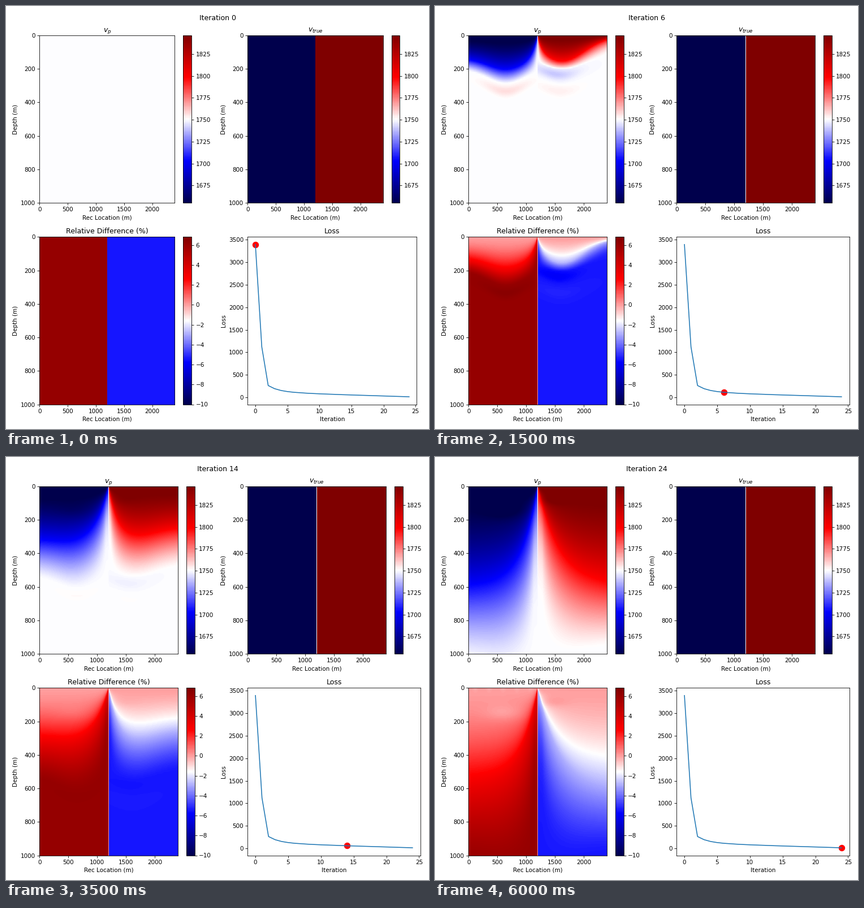
Animation of 748 by 748 pixels, one loop 6250 ms. Source, as a matplotlib script:

```python
import numpy as np
import matplotlib.pyplot as plt
from matplotlib.animation import FuncAnimation

SIZE, COUNT = 748, 25
V0, V_LEFT, V_RIGHT = 1750, 1650, 1850
VEL_RANGE, DIFF_RANGE = (1655, 1846.3), (-10, 6.82)

x, z = np.meshgrid(np.arange(5, 2400, 10.0), np.arange(5, 1000, 10.0))
d = np.abs(x - 1200)
right = x > 1200
v_true = np.where(right, V_RIGHT, V_LEFT)

# Front shape per iteration: depth at the edge, bulge, lateral scale
# of the half-strength contour; then depth and bulge of the deepest reach.
KEYS = [0, 4, 6, 10, 14, 18, 24]
LEFT = dict(
    edge=[20, 72, 140, 225, 320, 410, 597],
    bulge=[40, 92, 65, 45, 25, 10, 0],
    scale=[60, 70, 90, 160, 220, 280, 280],
    reach=[50, 110, 205, 375, 535, 705, 1030],
    swell=[40, 115, 85, 75, 75, 65, 50],
    center=550, width=450)
RIGHT = dict(
    edge=[-10, -15, 10, 160, 250, 372, 600],
    bulge=[50, 122, 148, 100, 55, 0, 0],
    scale=[50, 50, 50, 110, 130, 190, 370],
    reach=[10, 40, 125, 310, 480, 670, 960],
    swell=[50, 90, 80, 60, 70, 80, 40],
    center=420, width=550)

LOSS_X = [0, 1, 2, 3, 4, 5, 6, 8, 10, 14, 24]
LOSS_Y = [3393, 1120, 262, 192, 152, 128, 112, 92, 78, 57, 12]
steps = np.arange(COUNT)
loss = np.interp(steps, LOSS_X, LOSS_Y)


def bell(value, center, width):
    return np.exp(-((value - center) / width) ** 2)


def front(side, n):
    """Strength of the recovered anomaly, and the depth it reaches."""
    def at(name):
        return np.interp(n, KEYS, side[name])

    hump = bell(d, side["center"], side["width"])
    half = (at("edge") + at("bulge") * hump) * (1 - np.exp(-d / at("scale")))
    half = np.maximum(half, 2)
    reach = at("reach") + at("swell") * hump
    reach = np.maximum(reach, half + 15)
    fall = np.minimum(1 + 0.4 * (reach - half) / half, 4)
    t = np.clip((z - half) / (reach - half), 0, 1)
    upper = 1 - 0.53 * np.minimum(z / half, 1) ** 1.65
    return np.where(z < half, upper, 0.47 * (1 - t) ** fall), reach


def velocity(n):
    if n == 0:
        return np.full_like(x, V0)
    power = np.interp(n, [0, 1, 2, 3], [0, 0.55, 0.85, 1])
    late = np.interp(n, [8, 24], [0, 1])
    comb = np.interp(n, [14, 24], [0, 1])
    ripple = np.interp(n, KEYS, [0.12, 0.1, 0.07, 0.03, 0.015, 0.01, 0])

    a, reach = front(LEFT, n)
    a = a * power - ripple * bell(z, reach + 45, 32) * bell(d, 550, 420)
    a += 0.07 * late * bell(z, 150, 45) * bell(d, 580, 340)
    a += 0.06 * comb * np.exp(-z / 14) * np.cos(np.pi * (x - 120) / 240) ** 8

    b, reach = front(RIGHT, n)
    b = b * power - 1.4 * ripple * bell(z, reach + 32, 32) * bell(d, 300, 380)
    b += 0.5 * ripple * bell(z, reach + 130, 35) * bell(d, 350, 400)
    b += 0.06 * late * bell(z, 85, 30) * bell(d, 250, 260)
    return V0 + 100 * np.where(right, b, -a)


def image(ax, title, limits):
    im = ax.imshow(v_true, cmap="seismic", vmin=limits[0], vmax=limits[1],
                   extent=(0, 2400, 1000, 0), aspect="auto")
    ax.set(title=title, xlabel="Rec Location (m)", ylabel="Depth (m)")
    cax = fig.add_axes([0, 0, 0.1, 0.1])
    fig.colorbar(im, cax=cax)
    return im, cax


def place(ax, left, top, width, height=296.2):
    ax.set_position([left / SIZE, 1 - (top + height) / SIZE,
                     width / SIZE, height / SIZE])


def arrange(width, col2):
    """Lay out the panels; each colour bar takes a share of its cell."""
    for ax, cax, left, top in ((ax_vp, cax_vp, 59.2, 52),
                               (ax_true, cax_true, col2, 52),
                               (ax_diff, cax_diff, 59.2, 408.3)):
        place(ax, left, top, 0.8 * width)
        place(cax, left + 0.85 * width, top, 14.8)
    place(ax_loss, col2, 408.3, width)


fig = plt.figure(figsize=(10, 10), dpi=SIZE / 10)
ax_vp, ax_true, ax_diff, ax_loss = fig.subplots(2, 2).flat
im_vp, cax_vp = image(ax_vp, "$v_p$", VEL_RANGE)
im_true, cax_true = image(ax_true, "$v_{true}$", VEL_RANGE)
im_diff, cax_diff = image(ax_diff, "Relative Difference (%)", DIFF_RANGE)

ax_loss.plot(steps, loss)
dot = ax_loss.scatter([0], [loss[0]], s=100, color="red")
ax_loss.set(title="Loss", xlabel="Iteration", ylabel="Loss",
            xlim=(-1.2, 25.2), ylim=(-157, 3562))
heading = fig.suptitle("Iteration 0")


def update(n):
    if n == 0:
        arrange(299, 427.4)
    else:
        arrange(305.5, 427.2)
    vp = velocity(n)
    im_vp.set_data(vp)
    im_diff.set_data(100 * (vp - v_true) / v_true)
    dot.set_offsets([[n, loss[n]]])
    heading.set_text(f"Iteration {n}")
    return im_vp, im_diff, dot, heading


anim = FuncAnimation(fig, update, frames=COUNT, interval=250,
                     repeat=True, repeat_delay=0, blit=False)
plt.show()
```
